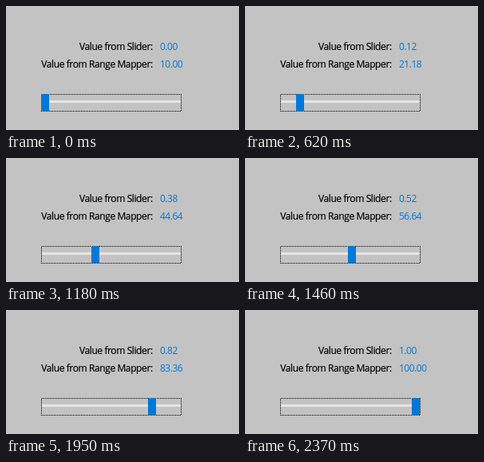
An HTML page for the animation above (2830 ms loop, 292 px wide and 155 px high).

```html
<!DOCTYPE html>
<html lang="en">
<head>
<meta charset="utf-8">
<title>Slider and range mapper</title>
<style>
html, body { margin: 0; width: 100%; height: 100%; overflow: hidden; background: #c3c3c3; }
svg { display: block; }
text { font: 12px "Open Sans", "Noto Sans", sans-serif; letter-spacing: -.4px; }
.label { text-anchor: end; stroke: #000; stroke-width: .2px; }
.value { letter-spacing: -.5px; }
.value, #thumb { fill: #0078d7; }
</style>
</head>
<body>
<svg width="292" height="155">
  <text class="label" x="183.7" y="55">Value from Slider:</text>
  <text class="label" x="183.7" y="77">Value from Range Mapper:</text>
  <text class="value" id="slider" x="193" y="55"></text>
  <text class="value" id="mapper" x="193" y="77"></text>
  <rect x="45" y="118" width="174" height="3" fill="#e6e6e6"/>
  <!-- Both halves run from the top left corner, so the dots keep one parity -->
  <g fill="none" stroke="#000" stroke-dasharray="1" shape-rendering="crispEdges">
    <path d="M44.5 110.5h175v21"/>
    <path d="M44.5 110.5v21h175"/>
  </g>
  <rect id="thumb" y="110" width="10" height="21"/>
</svg>
<script>
const LOOP = 2830, START = 200, STEP = 70, TRAVEL = 165;
// The drag as [step, thumb offset in px]
const drag = [[0, 0], [6, 20], [8, 27], [14, 63], [16, 72], [18, 85], [22, 114], [24, 125], [27, 152], [31, TRAVEL]];
const [slider, mapper, thumb] = ['slider', 'mapper', 'thumb'].map(id => document.getElementById(id));

function offsetAt(step) {
  const i = drag.findIndex(point => point[0] >= step);
  if (i < 0) return TRAVEL;
  if (i === 0) return 0;
  const [s0, x0] = drag[i - 1], [s1, x1] = drag[i];
  return Math.round(x0 + (x1 - x0) * (step - s0) / (s1 - s0));
}

function draw() {
  const time = performance.now() % LOOP;
  const offset = offsetAt(Math.max(0, Math.floor((time - START) / STEP)));
  const value = offset ? Math.min(1, (offset + .5) / TRAVEL) : 0;
  thumb.setAttribute('x', 44 + offset);
  slider.textContent = value.toFixed(2);
  mapper.textContent = (10 + 90 * value).toFixed(2);
  requestAnimationFrame(draw);
}
draw();
</script>
</body>
</html>
```
